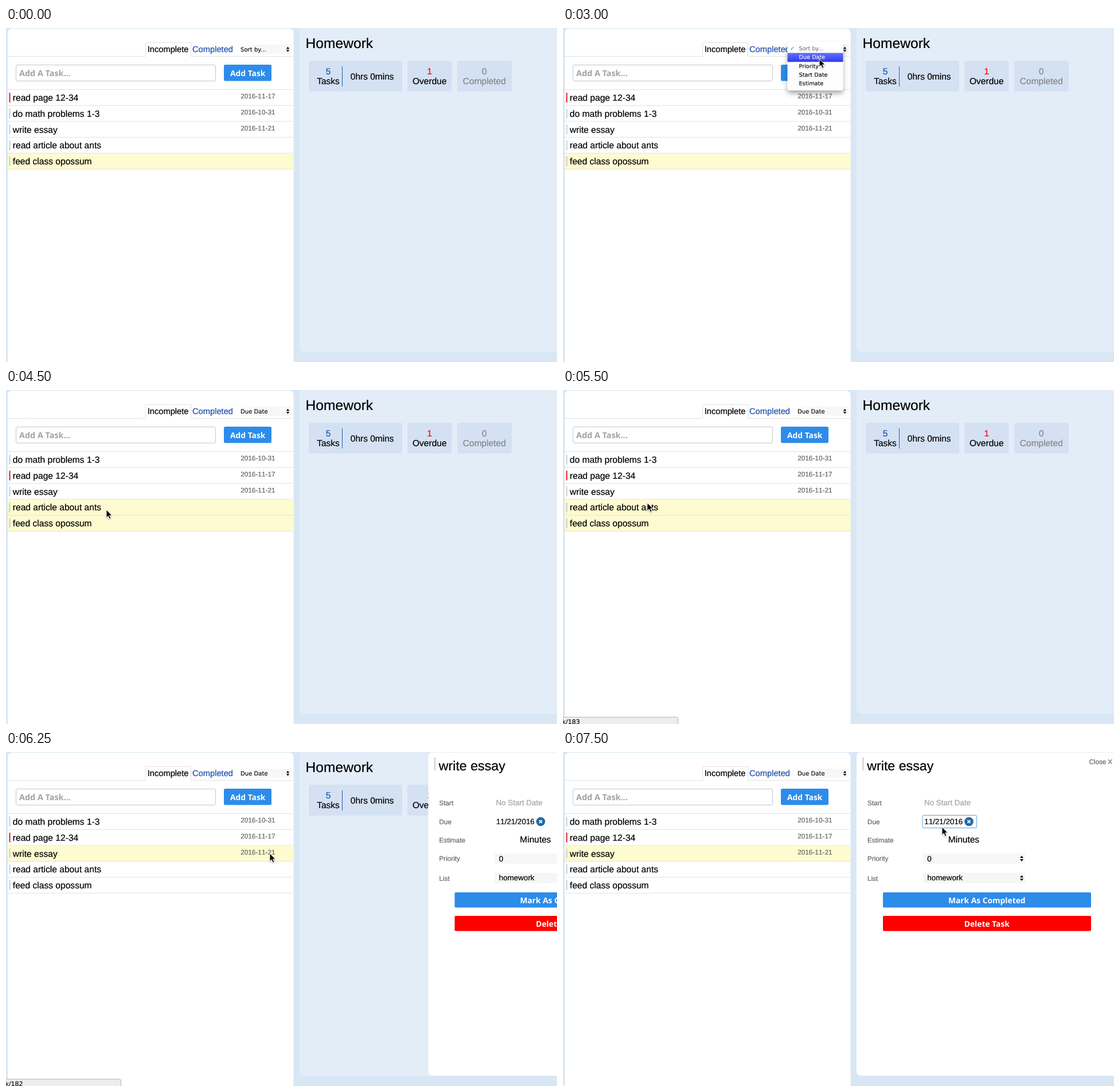
An HTML page that plays this animation: 961x583 px, repeating every 8 s.

```html
<!DOCTYPE html>
<html lang="en">
<head>
<meta charset="utf-8">
<title>Task list</title>
<style>
html, body { margin: 0; width: 100%; height: 100%; overflow: hidden; background: #d9e7f5; }
svg { display: block; width: 961px; height: 583px; color: #000; }
text { font: 15.5px "Liberation Sans", Arial, sans-serif; text-rendering: geometricPrecision; white-space: pre;
  fill: currentColor; stroke: currentColor; stroke-width: .22px; }
.row { font-size: 15.6px; }
.date { font-size: 11.8px; color: #666; font-kerning: none; }
.tab { font-size: 14.7px; }
.ui { font: 10.1px "DejaVu Sans", sans-serif; stroke-width: .1px; }
.menu { font-size: 9.7px; }
.bold { font: bold 13.8px "Noto Sans", sans-serif; color: #fff; stroke: none; }
.label { font-size: 11.7px; color: #666; }
.value { font-size: 13.4px; font-kerning: none; }
.mid { text-anchor: middle; }
.muted { color: #858585; }
.dots { fill: none; stroke: #c4c4c4; stroke-dasharray: 1 1; }
.stat { fill: #d4e1f3; }
.select { fill: #f6f6f6; }
</style>
</head>
<body>
<svg viewBox="0 0 961 583">
  <defs>
    <linearGradient id="blue" x2="0" y2="1">
      <stop stop-color="#6372f6"/><stop offset="1" stop-color="#2f3af2"/>
    </linearGradient>
    <linearGradient id="fade">
      <stop stop-color="#fff"/><stop offset=".4" stop-color="#f6f6f6"/><stop offset="1" stop-color="#f8f8f8"/>
    </linearGradient>
    <filter id="menuShadow" x="-20%" y="-20%" width="140%" height="150%">
      <feDropShadow dx="0" dy="5" stdDeviation="4" flood-opacity=".35"/>
    </filter>
    <filter id="cursorShadow" x="-50%" y="-50%" width="200%" height="200%">
      <feDropShadow dx="0" dy="1" stdDeviation="1" flood-opacity=".35"/>
    </filter>
    <path id="arrows" d="M-3-1L0-5 3-1ZM-3 1L0 5 3 1Z"/>
  </defs>

  <rect width="961" height="583" fill="#d9e7f5"/>

  <!-- task list -->
  <rect x="3" y="1" width="498.5" height="600" rx="8" fill="#fff"/>
  <path class="dots" d="M3 49.5H243.5V25.5H322.5V49.5H501"/>
  <text class="tab" x="246.7" y="42">Incomplete</text>
  <text class="tab" x="325" y="41.5" color="#1d4fb0">Completed</text>
  <rect x="404" y="29" width="95" height="16" fill="url(#fade)"/>
  <text class="ui" id="sortLabel" x="409" y="41"></text>
  <use href="#arrows" transform="translate(491.5 37.3) scale(.9)"/>
  <rect x="17.5" y="64.5" width="348" height="28" rx="2.5" fill="#fff" stroke="#c6c6c6"/>
  <text class="bold" x="23" y="84" style="color:#a3a3a3;font-size:14.4px">Add A Task...</text>
  <rect x="380" y="64" width="83" height="28.6" rx="2.5" fill="#2d8cea"/>
  <text class="bold mid" x="421.7" y="84">Add Task</text>
  <path class="dots" d="M3 107.5H501"/>
  <g id="rows"></g>

  <!-- list summary -->
  <rect x="512" y="0" width="470" height="565" rx="7" fill="#e3edf8"/>
  <text x="522.6" y="35" style="font-size:24.6px">Homework</text>
  <rect class="stat" x="528" y="57" width="163" height="54" rx="4"/>
  <rect class="stat" x="700" y="57" width="77.5" height="54" rx="4"/>
  <rect class="stat" x="787" y="57" width="95" height="54" rx="4"/>
  <text class="mid" x="562" y="80.8" color="#1c56bd">5</text>
  <text class="mid" x="562" y="98.3">Tasks</text>
  <path d="M586.5 67V102" stroke="#2459a8"/>
  <text class="mid" x="638.7" y="90">0hrs 0mins</text>
  <text class="mid" x="738.8" y="80.8" color="#f00">1</text>
  <text class="mid" x="738.8" y="98.3">Overdue</text>
  <text class="mid muted" x="834.3" y="80.8">0</text>
  <text class="mid muted" x="834.3" y="98.3">Completed</text>

  <!-- task details -->
  <g id="details">
    <rect x="512" y="1" width="470" height="564" rx="7" fill="#fff"/>
    <path d="M523.3 9V32" stroke="#ccc" stroke-width="2"/>
    <text x="530.3" y="31.5" style="font-size:23.2px">write essay</text>
    <text class="label" x="917.5" y="21" style="font-size:11.6px">Close X</text>
    <text class="label" x="531" y="93">Start</text>
    <text class="label" x="531" y="126">Due</text>
    <text class="label" x="531" y="158">Estimate</text>
    <text class="label" x="531" y="190">Priority</text>
    <text class="label" x="531" y="224.5">List</text>
    <text class="value" x="630" y="93" color="#a3a3a3">No Start Date</text>
    <rect id="dueBox" x="627" y="110.5" width="94.5" height="22" rx="2" fill="#fff" stroke="#58a3dc"/>
    <text class="value" x="630.3" y="126.3">11/21/2016</text>
    <circle cx="708" cy="121.5" r="7.8" fill="#1c68a6"/>
    <path d="M705.5 119L710.5 124M710.5 119L705.5 124" stroke="#fff" stroke-width="1.8"/>
    <text x="671.8" y="157.8">Minutes</text>
    <rect class="select" x="628" y="177" width="178" height="18"/>
    <rect class="select" x="628" y="211" width="178" height="18"/>
    <text class="value" x="635.3" y="190.5">0</text>
    <text class="value" x="635.3" y="224.3">homework</text>
    <use href="#arrows" x="800" y="186"/>
    <use href="#arrows" x="800" y="220"/>
    <rect x="558" y="245" width="363" height="26.5" rx="2" fill="#2d8cea"/>
    <rect x="558" y="286" width="363" height="26.5" rx="2" fill="#f00"/>
    <text class="bold mid" x="739.3" y="263.5">Mark As Completed</text>
    <text class="bold mid" x="739.3" y="304.7">Delete Task</text>
  </g>

  <g id="status">
    <rect x="-5" y="571" width="205.5" height="20" rx="3" fill="#ededed" stroke="#b4b4b4"/>
    <text class="ui" id="statusText" x="-1.5" y="583" style="font-size:11px"></text>
  </g>

  <g id="menu">
    <rect x="391.5" y="24.5" width="97" height="84.5" rx="4" fill="#fff" fill-opacity=".97" filter="url(#menuShadow)"/>
    <rect id="menuHover" x="391.5" y="43.5" width="97" height="15.7" fill="url(#blue)"/>
    <text class="ui menu" x="396" y="39" color="#777">✓</text>
    <text class="ui menu" x="411.5" y="39" color="#777">Sort by...</text>
    <text class="ui menu" id="dueItem" x="411.5" y="54.4">Due Date</text>
    <text class="ui menu" x="411.5" y="69.7">Priority</text>
    <text class="ui menu" x="411.5" y="85">Start Date</text>
    <text class="ui menu" x="411.5" y="100.4">Estimate</text>
  </g>

  <path id="cursor" d="M0 0V14L3.2 11 5.5 16.2 8 15.1 5.7 10H10Z" stroke="#fff" filter="url(#cursorShadow)"/>
</svg>
<script>
const STEP = 250, LOOP = 8000, ROW_HEIGHT = 27.75;
const $ = id => document.getElementById(id);
const show = (id, on) => $(id).setAttribute('display', on ? 'inline' : 'none');
const move = (el, x, y) => el.setAttribute('transform', `translate(${x} ${y})`);

const tasks = [
  ['read page 12-34', '2016-11-17', '#f01818'],
  ['do math problems 1-3', '2016-10-31'],
  ['write essay', '2016-11-21'],
  ['read article about ants', ''],
  ['feed class opossum', '']
];
$('rows').innerHTML = tasks.map(([name, date, color = '#ccc']) => `<g>
  <rect x="3" y="108" width="498.5" height="27.3" fill="#fffbd0"/>
  <path d="M6.5 113V130" stroke="${color}" stroke-width="2"/>
  <text class="row" x="11.8" y="127">${name}</text>
  <text class="date" x="409.2" y="123">${date}</text>
  <path class="dots" d="M3 135.3H501"/></g>`).join('');
const rows = [...$('rows').children];

// Pointer stops: step, x, y
const stops = [
  [1, 292, 187], [2, 350, 140], [3, 400, 100], [4, 432, 68], [5, 442, 52], [7, 446, 36],
  [9, 446, 37], [12, 447, 54], [13, 447, 54], [14, 545, 100], [15, 577, 150], [17, 577, 150],
  [18, 175, 209], [22, 147, 197], [23, 300, 187], [24, 460, 177], [27, 460, 177],
  [28, 560, 157], [29, 635, 138], [30, 661, 131], [32, 661, 131]
];

function pointerAt(step) {
  const next = Math.max(1, stops.findIndex(stop => stop[0] >= step));
  const [s0, x0, y0] = stops[next - 1], [s1, x1, y1] = stops[next];
  const k = (step - s0) / (s1 - s0);
  return [x0 + (x1 - x0) * k, y0 + (y1 - y0) * k];
}

function render(step) {
  const sorted = step >= 14, essayPicked = step >= 23;
  const order = sorted ? [1, 0, 2, 3, 4] : [0, 1, 2, 3, 4];
  const lit = essayPicked ? [2] : step >= 18 ? [3, 4] : [4];
  rows.forEach((row, i) => {
    move(row, 0, order[i] * ROW_HEIGHT);
    row.firstElementChild.style.opacity = lit.includes(i) ? 1 : 0;
  });
  $('sortLabel').textContent = sorted ? 'Due Date' : 'Sort by...';

  const dueHover = step >= 11;
  show('menu', step >= 9 && !sorted);
  show('menuHover', dueHover);
  $('dueItem').setAttribute('color', dueHover ? '#fff' : '#000');

  show('status', step >= 19 && step < 28);
  $('statusText').textContent = essayPicked ? 'k/182' : 'k/183';

  const slide = Math.min(1, Math.max(0, (step - 24) / 2));
  show('details', slide > 0);
  move($('details'), 449 * (1 - slide), 0);
  show('dueBox', step >= 30);

  show('cursor', step >= 1);
  move($('cursor'), ...pointerAt(step));
}

function tick() {
  render(Math.floor(performance.now() % LOOP / STEP));
  requestAnimationFrame(tick);
}
tick();
</script>
</body>
</html>
```
